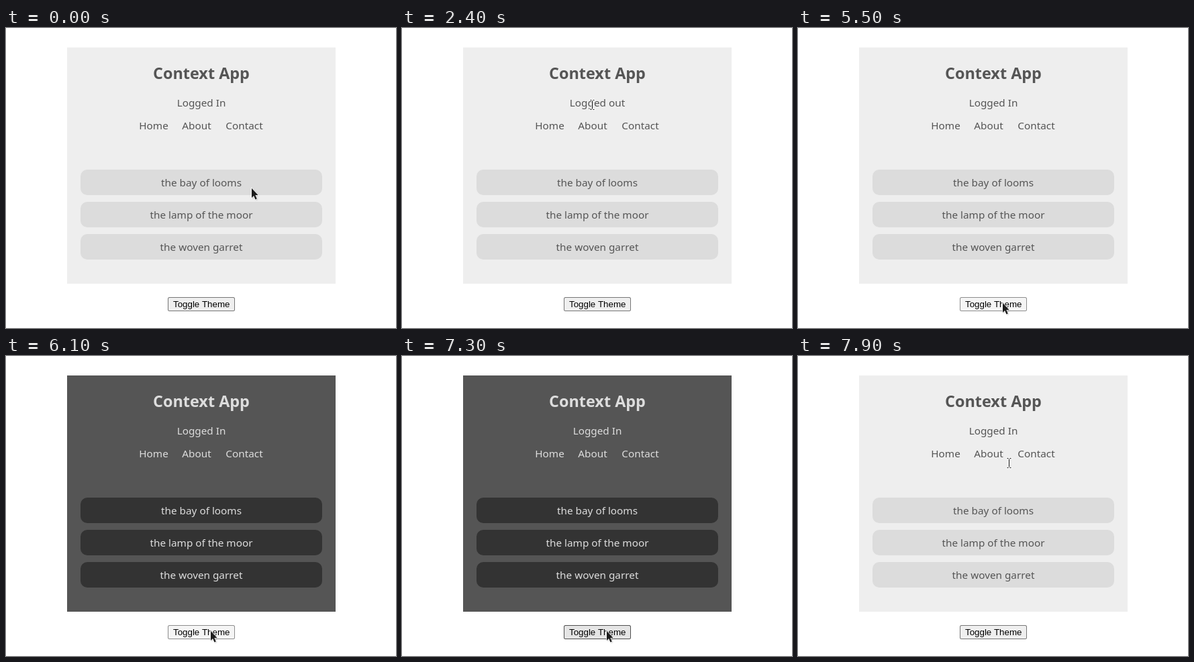
An HTML page with a canvas that plays this animation: 581x447 px, repeating every 8 s.

```html
<!DOCTYPE html>
<html lang="en">
<head>
<meta charset="utf-8">
<title>Context App</title>
<style>
  html, body { margin: 0; width: 100%; height: 100%; overflow: hidden; background: #fff; }
  canvas { display: block; }
</style>
</head>
<body>
<canvas id="stage" width="581" height="447"></canvas>
<script>
const ctx = document.getElementById('stage').getContext('2d');
const LOOP = 8000;
const SANS = '"Noto Sans", "Open Sans", sans-serif';
const BODY = '15.3px ' + SANS;

const themes = {
  light: { panel: '#eeeeee', item: '#dcdcdc', text: '#555555' },
  dark: { panel: '#555555', item: '#333333', text: '#dddddd' }
};
const buttonLooks = {
  idle: { fill: '#efefef', border: '#767676' },
  hover: { fill: '#e5e5e5', border: '#4f4f4f' },
  active: { fill: '#f5f5f5', border: '#8d8d8d' }
};
const books = ['the bay of looms', 'the lamp of the moor', 'the woven garret'];

// Each track lists [start time, value]; a value holds until the next entry.
const pointer = [
  [0, ['arrow', 365, 238]],
  [1200, ['arrow', 366, 257]],
  [1300, ['arrow', 367, 271]],
  [1500, ['arrow', 367, 273]],
  [1600, ['arrow', 308, 178]],
  [1700, ['arrow', 247, 107]],
  [1900, ['beam', 262, 113]],
  [2000, ['beam', 276, 114]],
  [2100, ['beam', 283, 114]],
  [4500, ['beam', 284, 116]],
  [4600, ['arrow', 283, 119]],
  [4800, ['arrow', 341, 311]],
  [5000, ['arrow', 326, 358]],
  [5100, ['arrow', 311, 395]],
  [5200, ['arrow', 305, 406]],
  [5300, ['arrow', 304, 409]],
  [7700, ['arrow', 308, 346]],
  [7800, ['arrow', 312, 218]],
  [7900, ['beam', 314, 159]]
];
const status = [
  [0, 'Logged In'], [2400, 'Logged out'], [3000, 'Logged In'],
  [3700, 'Logged out'], [4300, 'Logged In']
];
const theme = [
  [0, 'light'], [5600, 'dark'], [6300, 'light'], [7300, 'dark'], [7600, 'light']
];
const button = [
  [0, 'idle'], [5200, 'hover'], [5500, 'active'], [5600, 'hover'],
  [6100, 'active'], [6300, 'hover'], [6800, 'active'], [7300, 'hover'],
  [7500, 'active'], [7600, 'hover'], [7700, 'idle']
];

function at(track, time) {
  let value = track[0][1];
  for (const [start, next] of track) if (time >= start) value = next;
  return value;
}

function label(text, x, y, font, color, align = 'center') {
  ctx.font = font;
  ctx.fillStyle = color;
  ctx.textAlign = align;
  ctx.fillText(text, x, y);
}

function roundBox(x, y, w, h, r, color) {
  ctx.fillStyle = color;
  ctx.beginPath();
  ctx.roundRect(x, y, w, h, r);
  ctx.fill();
}

function drawPanel(colors, statusText) {
  ctx.fillStyle = colors.panel;
  ctx.fillRect(91, 29, 400, 352);
  label('Context App', 291, 76, 'bold 23.4px ' + SANS, colors.text);
  label(statusText, 291, 117, BODY, colors.text);
  label('Home', 220, 151, BODY, colors.text);
  label('About', 284, 151, BODY, colors.text);
  label('Contact', 355, 151, BODY, colors.text);
  books.forEach((title, i) => {
    const y = 211 + i * 48;
    roundBox(111, y, 360, 38, 10, colors.item);
    label(title, 291, y + 25, BODY, colors.text);
  });
}

function drawButton(look) {
  roundBox(241, 401, 100, 21, 2.5, look.border);
  roundBox(242, 402, 98, 19, 1.5, look.fill);
  label('Toggle Theme', 249, 416, '13.333px "Liberation Sans", Arial, sans-serif', '#000', 'left');
}

function drawArrow() {
  const path = new Path2D('M1 .7V15L4.1 12 6.5 17.6 8.8 16.6 6.4 11.1H10.6Z');
  ctx.save();
  ctx.shadowColor = 'rgba(0,0,0,.35)';
  ctx.shadowBlur = 2;
  ctx.shadowOffsetX = ctx.shadowOffsetY = 1;
  ctx.fillStyle = '#fff';
  ctx.fill(path);
  ctx.restore();
  ctx.lineWidth = 1.4;
  ctx.strokeStyle = '#fff';
  ctx.stroke(path);
  ctx.fillStyle = '#1c1c1c';
  ctx.fill(path);
}

function drawBeam() {
  const path = new Path2D('M-2.5 -6.5H-.5M1.5 -6.5H3.5M.5 -5.5V6.5M-2.5 7.5H-.5M1.5 7.5H3.5');
  ctx.lineCap = 'square';
  ctx.strokeStyle = 'rgba(255,255,255,.9)';
  ctx.lineWidth = 2.6;
  ctx.stroke(path);
  ctx.lineCap = 'butt';
  ctx.strokeStyle = '#111';
  ctx.lineWidth = 1;
  ctx.stroke(path);
}

function drawPointer([kind, x, y]) {
  ctx.save();
  ctx.translate(x, y);
  if (kind === 'arrow') drawArrow();
  else drawBeam();
  ctx.restore();
}

function render(now) {
  const time = now % LOOP;
  ctx.fillStyle = '#fff';
  ctx.fillRect(0, 0, 581, 447);
  drawPanel(themes[at(theme, time)], at(status, time));
  drawButton(buttonLooks[at(button, time)]);
  drawPointer(at(pointer, time));
  requestAnimationFrame(render);
}
render(0);
</script>
</body>
</html>
```
